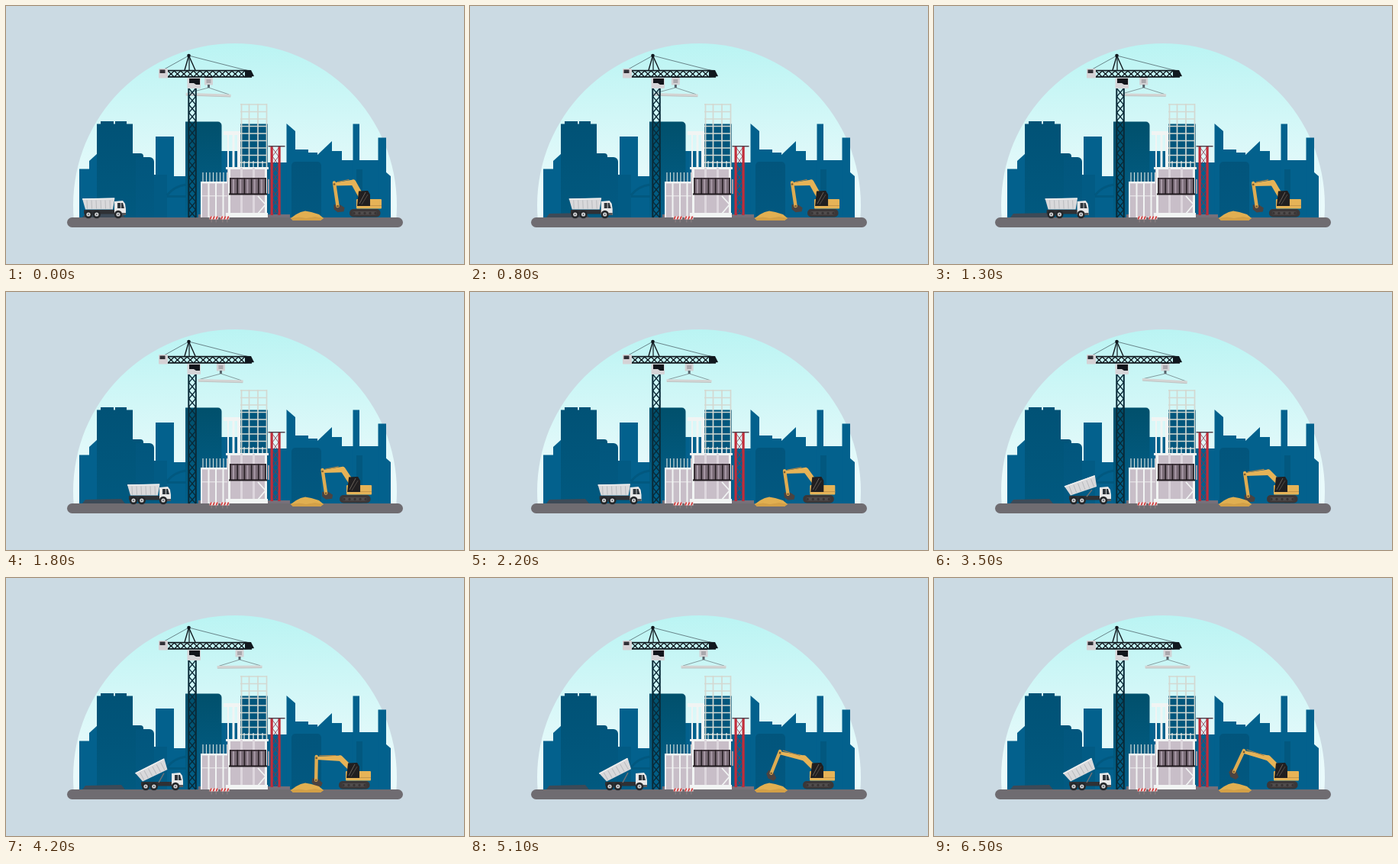
Write an HTML page with a canvas that moves like this. It is 600x338 px and loops after 6600 ms.

```html
<!DOCTYPE html>
<html lang="en">
<head>
<meta charset="utf-8">
<title>Construction site</title>
<style>
html, body { margin: 0; width: 100%; height: 100%; overflow: hidden; background: #cbdae3; }
canvas { display: block; width: 600px; height: 338px; }
</style>
</head>
<body>
<canvas id="stage"></canvas>
<script>
const LOOP = 6600, STEP = 100, W = 600, H = 338, GROUND = 277;
const canvas = document.getElementById('stage');
const scale = Math.max(1, window.devicePixelRatio || 1);
canvas.width = W * scale;
canvas.height = H * scale;
const c = canvas.getContext('2d');

// Motion helpers
const phase = (t, from, to) => Math.min(1, Math.max(0, (t - from) / (to - from)));
const smooth = u => u * u * (3 - 2 * u);
const easeOut = (u, power) => 1 - (1 - u) ** power;
const rad = deg => deg * Math.PI / 180;

// Drawing helpers
function rect(x, y, w, h, fill, r = 0) {
  c.fillStyle = fill;
  c.beginPath();
  c.roundRect(x, y, w, h, r);
  c.fill();
}
function path(points) {
  c.beginPath();
  for (let i = 0; i < points.length; i += 2) c.lineTo(points[i], points[i + 1]);
}
function poly(points, fill) {
  path(points);
  c.fillStyle = fill;
  c.fill();
}
function line(points, color, width = 1) {
  path(points);
  c.strokeStyle = color;
  c.lineWidth = width;
  c.stroke();
}
function dot(x, y, r, fill) {
  c.fillStyle = fill;
  c.beginPath();
  c.arc(x, y, r, 0, Math.PI * 2);
  c.fill();
}
function placed(x, y, deg, draw) {
  c.save();
  c.translate(x, y);
  c.rotate(rad(deg));
  draw();
  c.restore();
}
function fade(y0, y1, top, bottom) {
  const g = c.createLinearGradient(0, y0, 0, y1);
  g.addColorStop(0, top);
  g.addColorStop(1, bottom);
  return g;
}
function cross(x, y, w, h, color, width) {
  line([x, y, x + w, y + h], color, width);
  line([x + w, y, x, y + h], color, width);
}
// A building whose roof may slope from one side to the other
function block(left, right, roof, fill, roofRight = roof) {
  poly([left, GROUND, left, roof, right, roofRight, right, GROUND], fill);
}

function drawSky() {
  rect(0, 0, W, H, '#cbdae3');
  c.save();
  c.beginPath();
  c.rect(0, 0, W, 280);
  c.clip();
  dot(300, 261, 212, fade(49, 240, '#baf4f3', '#e9fafb'));
  c.restore();
}

function drawCity() {
  const blue = '#03618d', deep = '#015276', shade = '#02587f';
  block(96, 110, 213.5, blue);
  block(109, 120, 203, blue, 193);
  block(196, 220, 171, blue);
  block(194, 236, 223, blue);
  block(282, 308, 190, blue);
  block(342, 368, 205, blue);
  block(367.5, 379, 154, blue, 164);
  block(378, 396, 188, blue);
  block(395, 408, 192, blue);
  block(407, 427, 196, blue, 177);
  block(426, 440, 190, blue);
  block(439, 488, 202, blue);
  block(454.5, 463, 154.5, blue);
  block(487.5, 498, 172.5, blue);
  block(497, 504, 217, blue, 223);

  const left = fade(151, GROUND, deep, '#01597f');
  block(119, 166, 154.5, left);
  rect(124, 151, 17, 5, left);
  rect(143, 151, 15, 5, left);
  rect(166, 193, 14, 84, left, [0, 4, 0, 0]);
  rect(170, 198, 24, 79, fade(193, GROUND, '#02567d', '#025a82'), [0, 6, 0, 0]);
  rect(194, 221, 17, 56, '#025b84');
  rect(235, 151.5, 47.5, 125.5, fade(152, GROUND, '#01506c', '#02608a'), [0, 5, 0, 0]);
  block(307, 343, 154.5, '#02567c');
  rect(374, 204, 39, 73, fade(204, GROUND, '#02557c', '#025880'), [5, 5, 0, 0]);
  block(459, 467, 214, shade);

  c.strokeStyle = shade;
  c.lineWidth = 3;
  c.beginPath();
  c.moveTo(211, 248);
  c.quadraticCurveTo(220, 236, 236, 234);
  c.stroke();
  rect(211, 248, 25, 3, shade);
}

function drawGround() {
  poly([100, GROUND, 104, 272, 151, 271, 156, GROUND], '#3d4a57');
  rect(252, 273, 120, 5, '#77707a');
  rect(80, GROUND, 440, 13, '#6f6c71', 6.5);
}

function drawScaffold() {
  const cream = '#d3d8d1';
  for (const x of [308.5, 318.5, 330, 341.5]) line([x, 128, x, 212], cream, 1.7);
  for (let i = 0; i < 9; i++) line([307, 129 + i * 9.5, 342, 129 + i * 9.5], cream, 1.7);
}

function drawBuilding() {
  const white = '#f1f4f3', wall = '#c8bec8';
  rect(285, 164, 22, 5, white);
  for (let i = 0; i < 3; i++) rect(290 + i * 6.5, 168, 2 + i, 44, white);
  for (let x = 312; x < 342; x += 6) line([x, 203, x, 212], white, 1.2);

  for (let x = 258; x < 290; x += 4.5) line([x, 218, x, 233], '#d5dcda', 1.2);
  rect(255, 230, 36, 47, wall);
  rect(255, 230, 36, 2.5, white);
  rect(255, 248, 36, 1.5, '#e2dee2');
  for (let x = 255; x < 290; x += 9.5) rect(x, 230, 2, 47, white);

  rect(290, 212, 52, 65, wall);
  rect(288, 211, 56, 3, white);
  for (let x = 291; x < 342; x += 16) rect(x, 212, 3, 65, x < 300 || x > 335 ? white : '#ded7de');
  rect(293, 225, 48, 22, '#796b76');
  for (let x = 294; x < 342; x += 9.2) {
    line([x, 225, x, 247], '#241d22', 1.5);
    line([x + 4, 227, x + 4, 246], '#a99ba8', 2);
  }
  line([293, 226, 341, 226], '#30262c', 1.3);
  line([292, 246.5, 342, 246.5], '#1f191d', 2);
  line([330, 249, 340, 260, 330, 272], white, 1.8);
  rect(288, 271, 55, 6, white);
}

function drawTower() {
  const red = '#c22c39';
  for (let y = 186; y < 268; y += 11) cross(349, y, 8, 11, '#8f3044', 0.8);
  for (const x of [346.5, 356.5]) rect(x, 184, 3.2, 90, red);
  rect(343.5, 183, 22, 1.5, '#55434e');
}

function drawBarriers() {
  for (const x of [266.5, 281]) {
    for (const leg of [2, 8]) rect(x + leg, 276, 1.5, 7.5, '#857b7f');
    rect(x, 275.5, 11.5, 4, '#f1e9e9');
    for (let s = x; s < x + 10; s += 4) poly([s + 1.5, 275.5, s + 3.4, 275.5, s + 1.9, 279.5, s, 279.5], '#cf3a3b');
  }
}

function drawLoad(t) {
  const x = 265.5 + 40.5 * smooth(phase(t, 0, 4200));
  const sway = -5.5 * Math.cos((t - 2700) / 1650 * 2 * Math.PI) * Math.exp(-(((t - 2900) / 900) ** 2));
  const tilt = sway + 2 * (1 - smooth(phase(t, 0, 2500)));
  placed(x, 106, tilt, () => {
    line([-27, 9, 0, 1, 27, 9], '#68777b', 0.7);
    rect(-29.5, 8.8, 59, 3.4, '#d3d4d3');
    line([-29, 12, 29, 12], '#b3b6b6', 0.6);
  });
  rect(x - 5.5, 94, 11, 9.5, '#d2d2d5');
  rect(x - 3, 96, 6, 5, '#aaa8ad');
  rect(x - 5, 92, 10, 2, '#272a30');
  rect(x - 1.5, 103, 3, 4, '#57636b');
}

function drawCrane() {
  const ink = '#10181e', steel = '#092a38';
  for (const [x, y] of [[207, 83], [314, 84]]) line([239.5, 65, x, y], '#43545b', 0.7);
  line([234, 84, 239.5, 65, 248, 84], ink, 1.4);
  line([240, 65, 240, 84], ink, 1.2);
  dot(239.5, 65, 2.3, ink);

  for (let y = 108; y < GROUND; y += 10.6) cross(239.5, y, 9, Math.min(10.6, GROUND - y), steel, 1.4);
  for (const x of [238.3, 247.8]) rect(x, 106, 2, 171, steel);

  for (let x = 212; x < 312; x += 8.4) cross(x, 85, 8.4, 8, ink, 1.3);
  rect(210, 83.7, 106, 1.7, ink);
  rect(210, 92, 112, 1.7, ink);
  poly([313, 83.7, 321, 84, 325, 92, 313, 93.5], ink);
  rect(200, 82, 12, 12.5, '#d5d2d5', 1);
  rect(201.5, 83.5, 7, 4.5, '#312f35');

  rect(237.5, 94, 17.5, 14, '#d5d4d7', 1);
  poly([240, 95, 254, 95, 254, 103, 249, 103, 246, 101, 240, 101], '#11151b');
}

function drawTruck(t) {
  const tilt = -27 * easeOut(phase(t, 2800, 5000), 3);
  c.save();
  c.translate(75 * easeOut(phase(t, 0, 2800), 1.5), 0);
  rect(102, 267, 54, 5.5, '#2f3135', 1);
  if (tilt) line([125, 268, 132, 268 + tilt * 0.48], '#6e7175', 1.5);
  placed(104, 266.5, tilt, () => {
    poly([-4, -14, 38.5, -15, 36, 0, 0, 0], '#d9d9db');
    line([-4, -13.5, 38, -14.3], '#efefef', 1.6);
    for (let x = 2; x < 35; x += 6) line([x, -12, x + 0.5, -1], '#b9bbbe', 1);
  });
  poly([142, 256, 153, 255, 156, 259, 157, 266, 157, 274, 142, 274], '#e8e8e8');
  poly([146, 258, 153, 258, 155, 265, 146, 265], '#30363c');
  line([150.5, 258, 150.5, 265], '#e8e8e8', 0.8);
  rect(152, 271, 5, 3, '#54575b');
  for (const x of [108, 118.8, 147]) {
    dot(x, 273, 5.2, '#25272a');
    dot(x, 273, 2.6, '#d3d4d6');
    dot(x, 273, 0.9, '#505358');
  }
  c.restore();
}

function drawArm(dx, t) {
  const gold = '#e6b357';
  const reach = smooth(phase(t, 800, 3700)), lift = smooth(phase(t, 3500, 5500));
  const bx = 455 + dx - 3 * reach, by = 231 + 5 * reach;
  const ex = 430 + dx - 9 * reach - lift, ey = 233.5 + 5.5 * reach - 11 * lift;
  const swing = rad(9 - 36 * lift);
  const tx = ex + 29 * Math.sin(swing), ty = ey + 29 * Math.cos(swing);

  placed(tx, ty, 35 * lift, () => poly([-5, -2, 3, -2, 9, 2, 8, 7, 0, 8, -5, 4], '#4b4341'));
  c.lineJoin = c.lineCap = 'round';
  line([465 + dx, 249, bx, by], gold, 7);
  poly([ex, ey - 2, bx, by - 3.5, bx + 1, by + 4, ex, ey + 2], gold);
  line([ex, ey - 2, tx, ty], '#deac52', 4.4);
  line([bx - 6, by - 3.5, ex + 4, ey - 3], '#a9834a', 1.2);
  c.lineJoin = 'miter';
  c.lineCap = 'butt';
  dot(ex, ey, 1.3, '#795a30');
  dot(tx, ty, 1.3, '#795a30');
}

function drawDigger(t) {
  const dx = -14 * easeOut(phase(t, 0, 2800), 2.5), gold = '#e6b357';
  drawArm(dx, t);
  c.save();
  c.translate(dx, 0);
  rect(450, 266, 40.5, 10.5, '#3b3738', 5);
  rect(454, 269, 32, 4.5, '#504c4c', 2.2);
  for (let x = 456; x < 488; x += 7) dot(x, 271.3, 1.6, '#373334');
  rect(459, 253, 33, 12.5, gold, 1);
  rect(477, 261, 15, 1, '#c4954a');
  poly([462, 242.5, 474, 242, 477, 247, 477, 262, 460, 262], '#211f20');
  line([463, 259, 471, 244], '#69625a', 1);
  line([466, 260, 474, 247], '#514b46', 1);
  c.restore();
}

function drawSand() {
  poly([373, 278, 380, 273, 386, 270, 392, 268.5, 400, 270, 410, 273, 416, 278, 412, 281, 376, 281], '#e1af51');
  poly([373, 278, 384, 276.5, 393, 278, 405, 276, 416, 278, 412, 281, 376, 281], '#d3a047');
}

function draw(t) {
  c.setTransform(scale, 0, 0, scale, 0, 0);
  drawSky();
  drawCity();
  drawGround();
  drawScaffold();
  drawBuilding();
  drawTower();
  drawLoad(t);
  drawCrane();
  drawBarriers();
  drawTruck(t);
  drawDigger(t);
  drawSand();
}

let shown = -1;
function tick() {
  const t = Math.floor(performance.now() % LOOP / STEP) * STEP;
  if (t !== shown) draw(shown = t);
  requestAnimationFrame(tick);
}
tick();
</script>
</body>
</html>
```
